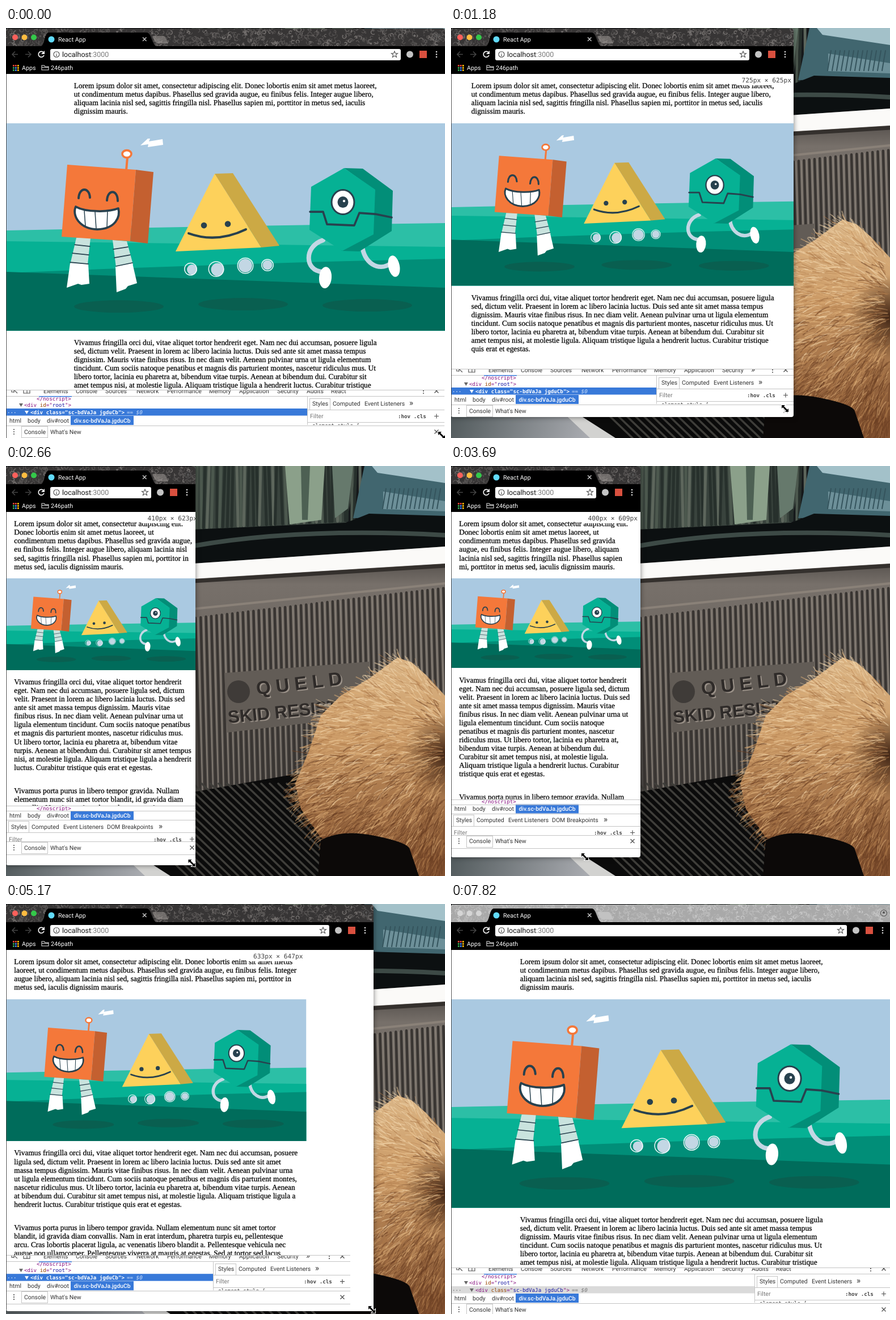
Animation, 774 px wide and 723 px high, one loop 7920 ms. Source, as an HTML page with a canvas:

```html
<!DOCTYPE html>
<html lang="en">
<head>
<meta charset="utf-8">
<title>Responsive page</title>
<style>
  html, body { margin: 0; width: 774px; height: 723px; overflow: hidden; }
  canvas { display: block; }
</style>
</head>
<body>
<canvas id="stage" width="774" height="723"></canvas>
<script>
const LOOP = 7920, STEP = 147.6, ZOOM = 0.835;
const UI = '10.5px Roboto, sans-serif';
const TITLE = '10.7px Roboto, sans-serif';
const MONO = '9.2px "DejaVu Sans Mono", monospace';
const SERIF = '13.36px "Liberation Serif", serif';
const INK = '#28414e', PALE = '#c3d7e4';

// step, window width, window height, page width, devtools width, devtools top, pointer x, pointer y
const KEYS = [
  [1, 774, 726, 773, 773, 640, 768, 718],
  [8, 604, 686, 605, 604, 603, 589, 671],
  [9, 573, 677, 590, 585, 597, 566, 668],
  [14, 437, 641, 480, 480, 572, 430, 636],
  [17, 334, 690, 350, 350, 590, 355, 686],
  [19, 334, 718, 334, 334, 612, 300, 714],
  [22, 334, 674, 334, 334, 589.5, 236, 672],
  [25, 334, 690, 334, 334, 589.5, 236, 689],
  [27, 340, 700, 334, 334, 598, 337, 697],
  [31, 544, 712, 440, 500, 612, 541, 709],
  [35, 648, 718, 528.5, 607, 621.2, 645, 715],
  [39, 768, 725, 660, 745, 636, 764, 719],
  [43, 772, 727, 773, 771, 643, 763, 717],
  [46, 776, 727, 777, 777, 643, 766, 721],
  [50, 776, 727, 777, 777, 643, 785, 740]
];

const INTRO = 'Lorem ipsum dolor sit amet, consectetur adipiscing elit. Donec lobortis enim sit amet metus laoreet, ut condimentum metus dapibus. Phasellus sed gravida augue, eu finibus felis. Integer augue libero, aliquam lacinia nisl sed, sagittis fringilla nisl. Phasellus sapien mi, porttitor in metus sed, iaculis dignissim mauris.';
const BODY = 'Vivamus fringilla orci dui, vitae aliquet tortor hendrerit eget. Nam nec dui accumsan, posuere ligula sed, dictum velit. Praesent in lorem ac libero lacinia luctus. Duis sed ante sit amet massa tempus dignissim. Mauris vitae finibus risus. In nec diam velit. Aenean pulvinar urna ut ligula elementum tincidunt. Cum sociis natoque penatibus et magnis dis parturient montes, nascetur ridiculus mus. Ut libero tortor, lacinia eu pharetra at, bibendum vitae turpis. Aenean at bibendum dui. Curabitur sit amet tempus nisi, at molestie ligula. Aliquam tristique ligula a hendrerit luctus. Curabitur tristique quis erat et egestas.';
const MORE = 'Vivamus porta purus in libero tempor gravida. Nullam elementum nunc sit amet tortor blandit, id gravida diam convallis. Nam in erat interdum, pharetra turpis eu, pellentesque arcu. Cras lobortis placerat ligula, ac venenatis libero blandit a. Pellentesque vehicula nec augue non ullamcorper. Pellentesque viverra at mauris at egestas. Sed at tortor sed lacus';

let g = document.getElementById('stage').getContext('2d');
let seed = 7;
const random = () => (seed = seed * 16807 % 2147483647) / 2147483647;

function path(d, fill, stroke, width = 1) {
  const shape = new Path2D(d);
  if (fill) { g.fillStyle = fill; g.fill(shape); }
  if (stroke) { g.strokeStyle = stroke; g.lineWidth = width; g.stroke(shape); }
}
function rect(x, y, w, h, color) { g.fillStyle = color; g.fillRect(x, y, w, h); }
function oval(x, y, rx, ry, fill, stroke, width = 1, turn = 0) {
  g.beginPath();
  g.ellipse(x, y, rx, ry, turn, 0, 7);
  if (fill) { g.fillStyle = fill; g.fill(); }
  if (stroke) { g.strokeStyle = stroke; g.lineWidth = width; g.stroke(); }
}
// y is the middle of the lower-case letters' line
function text(s, x, y, font = UI, color = '#333', align = 'left') {
  g.font = font;
  g.fillStyle = color;
  g.textAlign = align;
  g.fillText(s, x, y + (font === SERIF ? 4.4 : 3.6));
  return x + g.measureText(s).width;
}
function clipped(x, y, w, h, draw) {
  g.save();
  g.beginPath();
  g.rect(x, y, w, h);
  g.clip();
  draw();
  g.restore();
}
function layer(w, h, draw) {
  const canvas = Object.assign(document.createElement('canvas'), { width: w, height: h });
  const previous = g;
  g = canvas.getContext('2d');
  g.lineCap = g.lineJoin = 'round';
  draw();
  g = previous;
  return canvas;
}

const lace = (base, thread, glow) => layer(790, 32, () => {
  seed = 11;
  rect(0, 0, 790, 32, base);
  for (let i = 0; i < 800; i++) {
    const x = random() * 790, y = random() * 32, r = 1 + random() * 3, a = random() * 6;
    g.beginPath();
    g.arc(x, y, r, a, a + 2 + random() * 3);
    g.strokeStyle = i % 5 ? thread : glow;
    g.lineWidth = 0.7 + random();
    g.stroke();
  }
});
const activeBar = lace('#373535', '#585554', '#787472');
const idleBar = lace('#a9a9a9', '#b9b9b9', '#cacaca');

function windows() {
  path('M330 0H620L600 100L330 125Z', '#39433d');
  seed = 3;
  for (let x = 330; x < 625; x += 7) {
    path(`M${x} 0l${random() * 8 - 4} ${110 - (x - 330) * 0.05}`, null, ['#27302c', '#4c584e', '#5d665c'][Math.floor(random() * 3)], 5);
  }
  path('M492 0H562L556 95L500 103Z', '#8ba08a');
  path('M520 0H536L532 95H522Z', '#4d6053');
  path('M575 0H612L603 75L580 92Z', '#66796c');
  path('M632 0H774V88L612 92Z', '#41666f');
  path('M645 0H774V30L655 12Z', '#a3c1c9');
  path('M665 45L774 62V80L665 76Z', '#6d9099');
  for (let x = 670; x < 774; x += 8) path(`M${x} 40l-6 35`, null, '#35545d', 2);
  path('M330 112L600 100L640 84L774 88V142L330 172Z', '#0c1011');
  path('M330 141Q520 108 774 122', null, '#3d4a46', 8);
}

function tailgate() {
  const metal = g.createLinearGradient(0, 170, 0, 560);
  metal.addColorStop(0, '#56514d');
  metal.addColorStop(0.1, '#77706a');
  metal.addColorStop(0.6, '#66605a');
  metal.addColorStop(1, '#4b4744');
  path('M330 172L774 142V723H330Z', metal);
  path('M330 172L774 142V172L330 199Z', '#fbfaf8');
  path('M330 203L774 176', null, '#34302d', 7);
  path('M330 252L774 207', null, '#8a8178', 4);
  for (let x = 334; x < 774; x += 9.3) {
    const top = 268 - (x - 334) * 0.12, low = 572 - (x - 334) * 0.15;
    path(`M${x} ${top}L${x + 8} ${low}`, null, '#393532', 4.5);
    path(`M${x + 4.5} ${top}L${x + 12.5} ${low}`, null, '#867e75', 1.8);
  }
  path('M385 365L640 345V430L560 450L390 470Z', '#625c56');
  oval(410, 398, 20, 20, '#3f3b38');
  const emboss = (s, x, y, size, turn) => {
    g.save();
    g.translate(x, y);
    g.rotate(turn);
    const font = `bold ${size}px "Liberation Sans", sans-serif`;
    text(s, 2, 2, font, '#9a9188');
    text(s, 0, 0, font, '#2f2b29');
    g.restore();
  };
  emboss('Q U E L D', 442, 400, 33, -0.12);
  emboss('SKID RESIST', 392, 450, 31, -0.1);
}

function truckBed() {
  path('M0 560L330 575L500 545L774 500V723H0Z', '#0b0b0b');
  for (let x = 150; x < 700; x += 15) path(`M${x} 560L${x + 170} 723`, null, '#3f3e3a', 3.5);
  const silver = g.createLinearGradient(0, 640, 240, 723);
  silver.addColorStop(0, '#4c5557');
  silver.addColorStop(1, '#a9abb0');
  path('M0 600H120L255 723H0Z', silver);
  path('M120 605L160 640L290 723H245Z', '#d2d2d0');
}

function fur() {
  const outline = 'M774 405L740 368L715 346L690 338L640 375L590 405L555 440L535 500L510 560L520 605L555 655L640 680L720 723H774Z';
  const body = new Path2D(outline);
  const coat = g.createLinearGradient(650, 340, 640, 690);
  coat.addColorStop(0, '#d9b485');
  coat.addColorStop(0.4, '#cb9a66');
  coat.addColorStop(1, '#80502f');
  path(outline, coat);
  const dark = g.createRadialGradient(774, 510, 5, 774, 510, 75);
  dark.addColorStop(0, 'rgba(50,25,12,.85)');
  dark.addColorStop(1, 'rgba(50,25,12,0)');
  rect(690, 430, 84, 160, dark);
  seed = 5;
  g.globalAlpha = 0.5;
  for (let i = 0; i < 3600; i++) {
    const x = 505 + random() * 269, y = 338 + random() * 385;
    if (!g.isPointInPath(body, x, y)) continue;
    // hair fans out from the right edge and hangs lower down
    const a = Math.atan2(y - 500, x - 830) + (random() - 0.5) * 0.8, n = 10 + random() * 20;
    const light = random() * 1.1 - (y - 340) / 420 - (x > 735 ? 0.2 : 0);
    const tone = light > 0.45 ? '#f3d8ae' : light > 0.1 ? '#dcae78' : light > -0.25 ? '#b07b4b' : '#6b4023';
    path(`M${x} ${y}q${Math.cos(a) * n * 0.5} ${Math.sin(a) * n * 0.3} ${Math.cos(a) * n} ${Math.sin(a) * n + 4}`, null, tone, 0.8 + random() * 1.4);
  }
  g.globalAlpha = 1;
  path('M555 660Q590 640 650 652T712 676L728 723H550Z', '#0c0908');
}

const photo = layer(774, 723, () => {
  rect(0, 0, 774, 723, '#15181a');
  windows();
  tailgate();
  truckBed();
  fur();
});

function scene(x, y, scale) {
  g.save();
  g.translate(x, y);
  g.scale(scale, scale);
  g.lineCap = g.lineJoin = 'round';
  rect(0, 0, 773, 365.6, '#aac9e1');
  path('M0 189Q380 181 773 176V365.6H0Z', '#2cbfa6');
  path('M0 208L773 218V365.6H0Z', '#06b194');
  path('M0 264Q390 247 773 239V365.6H0Z', '#018e78');
  path('M0 262L773 290V365.6H0Z', '#006c5b');
  oval(198, 323, 79, 11, '#095f50');
  oval(417, 319, 79, 11, '#095f50');
  oval(636, 321, 79, 11, '#095f50');
  path('M236 39L249 27L253 27L251 32L275 28L276 38L249 42L250 37Z', '#fff');

  // cube
  path('M123 202H148L143 249H112Z M187 206L212 208L223 249L193 254Z', '#c9e3de');
  path('M112 247L144 248L146 283L132 285L126 283L106 290Z M192 253L222 247L230 282L214 287L210 292L194 298Z', '#fff');
  path('M120 214L147 217M116 229L145 232M112 245L144 248M188 222L214 218M190 237L218 232M193 252L222 246', null, INK, 1.6);
  path('M211 83L213 60', null, '#f4783a', 4);
  oval(212, 54, 8, 6.5, '#fff', '#f4783a', 3.6);
  path('M107 73L228 82L218 208L97 200Z', '#f4783a');
  path('M228 82L259 86L249 212L218 208Z', '#c46030');
  path('M127 132C128 112 146 112 147 131M177 136C178 116 196 116 196 137', null, INK, 4);
  path('M122 147C115 162 128 186 160 187C192 186 201 165 197 150C180 157 140 157 122 147Z', '#fff', INK, 3.8);
  path('M137 154L139 181M156 156L158 186M178 155L177 183', null, INK, 1.5);

  // pyramid
  path('M367 89L449 219L298 226Z', '#fdd15b');
  path('M367 89L399 88L481 216L449 219Z', '#cca945');
  oval(348, 180, 5.3, 5.3, INK);
  oval(390, 177.5, 5.3, 5.3, INK);
  path('M321 194Q370 212 422 187', null, INK, 4);
  [[326, 257, 9], [371, 257, 11.5], [421, 251, 12], [460, 250, 8.5]].forEach(([bx, by, r], i) => {
    oval(bx + (i < 2 ? 1 : 0), by + (i < 2 ? 1 : 0), r, r, PALE);
    oval(bx - (i < 2 ? 1.5 : 0), by, r + 1.7, r + 1.7, null, '#eff8fa', 1.5);
  });

  // hexagon
  path('M558 206C524 217 525 260 557 262M627 215C629 245 655 263 678 247', null, PALE, 8);
  oval(562, 272, 11, 19, '#fff', null, 1, 0.08);
  oval(683, 252, 10, 19, '#fff', null, 1, -0.2);
  path('M595 79L628 80L681 119L679 190L622 226L590 225L640 190L645 115Z', '#028e78');
  path('M595 79L650 117L647 196L592 225L534 188L537 112Z', '#06b194');
  oval(593, 139, 20, 21.5, '#fff', INK, 3);
  oval(593, 139, 9.5, 10, INK);
  oval(595, 137, 2.2, 2.2, '#fff');
  path('M535 156L558 156L565 178L613 180L622 158L650 160L679 166', null, INK, 3.6);
  g.restore();
}

// Returns the middle of the last line
function paragraph(words, x, y, width) {
  const print = line => {
    text(line, x, y, SERIF, '#000');
    g.strokeStyle = '#000';
    g.lineWidth = 0.25;
    g.strokeText(line, x, y + 4.4);
  };
  let line = '';
  g.font = SERIF;
  for (const word of words.split(' ')) {
    const longer = line ? line + ' ' + word : word;
    if (g.measureText(longer).width > width) {
      print(line);
      y += 15.03;
      line = word;
    } else line = longer;
  }
  print(line);
  return y;
}

function page(width, bottom, labelled) {
  clipped(1, 81, width, bottom - 83, () => {
    const column = Math.min(534.4, width - 27.5), x = (width - column) / 2 + 0.5;
    const top = paragraph(INTRO, x, 102, column) + 21;
    scene(1, top, width / 773);
    const end = paragraph(BODY, x, top + width * 0.473 + 21, column);
    paragraph(MORE, x, end + 41, column);
    if (labelled) {
      rect(width - 102, 81, 104, 20, '#fff');
      text(`${Math.round(width / ZOOM)}px × ${Math.round((bottom - 81) / ZOOM)}px`, width - 5, 92.5,
        '11.2px "DejaVu Sans Mono", monospace', '#444', 'right');
    }
  });
}

function chrome(width, focused) {
  g.drawImage(focused ? activeBar : idleBar, 0, 1);
  rect(0, 32, width, 49, '#000');
  ['#fc605b', '#fdbc40', '#34c84a'].forEach((c, i) => oval(16 + i * 16.5, 16.5, 5, 5, focused ? c : '#d5d5d5'));
  path('M62 32C68 30 68 9 75 8H249C256 9 258 30 265 32Z', '#000');
  path('M258 14H278Q281 14 286 27H268Q263 27 258 14Z', focused ? 'rgba(150,145,142,.6)' : '#c2c2c2');
  oval(width - 13, 16, 5.5, 5.5, null, '#555', 1.2);
  oval(width - 13, 15, 2, 2, '#555');
  oval(80, 20, 5.5, 5.5, '#61dafb');
  text('React App', 92, 20, TITLE, '#fff');
  path('M241 16.500L247.500 23M247.500 16.500L241 23', null, '#ccc', 1.4);
  path('M21 46.500H11M16 41.500L11 46.500L16 51.500M34 46.500H44M39 41.500L44 46.500L39 51.500', null, '#444', 1.6);
  path('M66 43A5 5 0 1 0 67 48', null, '#fff', 1.7);
  path('M68 40V46H62Z', '#fff');
  g.beginPath();
  g.roundRect(78, 37, width - 156, 20, 3);
  g.fillStyle = '#fff';
  g.fill();
  oval(89, 46.5, 5, 5, null, '#555', 1.2);
  path('M89 43.500V44.500M89 46V50', null, '#555', 1.2);
  const url = '12.5px Roboto, sans-serif';
  text(':3000', text('localhost', 99, 47, url, '#111'), 47, url, '#777');

  g.save();
  g.translate(width - 89, 46.5);
  path('M0 -5.500L1.500 -1.800H5.500L2.400 .8L3.500 5L0 2.600L-3.500 5L-2.400 .8L-5.500 -1.800H-1.500Z', null, '#555', 1.1);
  oval(27, 0, 6, 6, '#c4c4c4');
  rect(44, -6.5, 13, 13, '#d9503f');
  for (const y of [-4.5, 0, 4.5]) oval(74, y, 1.3, 1.3, '#ddd');
  g.restore();

  const dots = ['#ea4335', '#ea4335', '#fbbc05', '#34a853', '#4285f4', '#fbbc05', '#34a853', '#4285f4', '#fbbc05'];
  dots.forEach((c, i) => rect(12 + i % 3 * 4, 65 + Math.floor(i / 3) * 4, 2.8, 2.8, c));
  text('Apps', 28, 70, TITLE, '#fff');
  path('M63 74V66H67L69 68H75V74ZM63 69.500H75', null, '#ddd', 1.1);
  text('246path', 79, 70, TITLE, '#fff');
}

function code(parts, x, y, font = MONO) {
  for (const [s, color] of parts) x = text(s, x, y, font, color);
}
const rule = (x, y, w) => rect(x, Math.round(y), w, 1, '#c4c4c4');
const cross = (x, y, r = 3.5) => path(`M${x - r} ${y - r}l${2 * r} ${2 * r}M${x + r} ${y - r}l${-2 * r} ${2 * r}`, null, '#555', 1.4);
const kebab = (x, y) => [-4, 0, 4].forEach(d => oval(x, y + d, 1.1, 1.1, '#555'));

function styleTabs(names, x, y) {
  g.strokeStyle = '#c4c4c4';
  g.lineWidth = 1;
  g.strokeRect(Math.round(x) + 4.5, Math.round(y) - 9.5, 36, 20);
  names.forEach(([name, dx]) => text(name, x + dx, y, name === '»' ? '15px Roboto, sans-serif' : UI));
}
function filterRow(x, right, y) {
  text('Filter', x + 5, y, UI, '#777');
  text(':hov .cls', right - 82, y, 'bold ' + MONO, '#444');
  path(`M${right - 18} ${y}h8m-4 -4v8`, null, '#555', 1.2);
}
function breadcrumb(y) {
  rect(114, y - 8, 111, 16, '#3879d9');
  text('html', 6, y);
  text('body', 38, y);
  text('div#root', 72, y);
  text('div.sc-bdVaJa.jgduCb', 169.5, y, '500 10.3px Roboto, sans-serif', '#fff', 'center');
}

function elementsPanel(width, top, focused) {
  const split = width - 242;
  const tag = '#881280', name = '#994500', value = '#1a1aa6';
  clipped(0, top - 1, width, 12, () => {
    path(`M10 ${top - 4}v6h4m0 -4l6 6m-6 -6v5M31 ${top - 6}h11v10h-11zM37 ${top - 6}v10`, null, '#555', 1.2);
    const tabs = { Elements: 66, Console: 123, Sources: 175, Network: 230, Performance: 284, Memory: 358, Application: 411, Security: 478, Audits: 530, React: 573 };
    for (const tab in tabs) if (tabs[tab] + 60 < width - 55) text(tab, tabs[tab], top);
    if (width < 650) text('»', 529, top, '15px Roboto, sans-serif');
    kebab(width - 37, top);
    cross(width - 14, top);
  });
  rule(0, top + 9, width);
  rect(58, top + 9, 58, 1.5, '#3879d9');
  clipped(0, top + 10, split, 34, () => {
    text('</noscript>', 54, top + 13, MONO, tag);
    path(`M23 ${top + 22}h7l-3.500 6z`, '#666');
    code([['<div ', tag], ['id', name], ['="', tag], ['root', value], ['">', tag]], 32, top + 24.5);
    rect(0, top + 31, split, 12.5, focused ? '#3879d9' : '#dadada');
    const pick = c => focused ? '#fff' : c;
    text('...', 2, top + 35, MONO, pick('#666'));
    path(`M33 ${top + 35}h7l-3.500 6z`, pick('#666'));
    code([['<div ', pick(tag)], ['class', pick(name)], ['="', pick(tag)], ['sc-bdVaJa jgduCb', pick(value)], ['">', pick(tag)]],
      43, top + 37, focused ? 'bold ' + MONO : MONO);
    text('== $0', 213, top + 37, 'italic ' + MONO, focused ? '#cfe0fa' : '#777');
  });
  breadcrumb(top + 52);
  rect(split, top + 10, 1, 50, '#c4c4c4');
  styleTabs([['Styles', 9], ['Computed', 45], ['Event Listeners', 101], ['»', 180]], split, top + 22.5);
  rule(split, top + 33, 242);
  filterRow(split, width, top + 44.5);
  rule(split, top + 55, 242);
  clipped(split, top + 56, 242, 4, () => text('element.style {', split + 9, top + 60, MONO));
}

function compactPanel(width, top) {
  const wide = width > 400, right = wide ? 302 : width;
  clipped(0, top - 1, width, 8, () => text('</noscript>', 54, top + 2, MONO, '#881280'));
  breadcrumb(top + 15);
  rule(0, top + 7, width);
  rule(0, top + 23, width);
  styleTabs(wide
    ? [['Styles', 9], ['Event Listeners', 45], ['DOM Breakpoints', 122], ['Properties', 210], ['Accessibility', 264]]
    : [['Styles', 9], ['Computed', 45], ['Event Listeners', 101], ['DOM Breakpoints', 178], ['»', 269]], 0, top + 35);
  rule(0, top + 45, width);
  clipped(0, top + 46, width, 15, () => {
    filterRow(0, right, top + 57);
    if (wide) rect(302, top + 46, 1, 15, '#c4c4c4');
  });
}

function devtools(width, top, focused) {
  rule(0, top - 2, width);
  if (width > 530) elementsPanel(width, top, focused);
  else compactPanel(width, top);
  rule(0, top + 61, width);
  kebab(14, top + 72);
  g.strokeStyle = '#c4c4c4';
  g.lineWidth = 1;
  g.strokeRect(27.5, Math.round(top) + 62.5, 46, 20);
  text('Console', 32, top + 72);
  text("What's New", 78, top + 72);
  cross(width - 14, top + 72);
  rule(0, top + 84, width);
}

function pointer(x, y) {
  g.save();
  g.translate(x, y);
  const arrow = 'M-6 -6H0L-2 -4L4 2L6 0V6H0L2 4L-4 -2L-6 0Z';
  path(arrow, '#000', '#fff', 2);
  path(arrow, '#000');
  g.restore();
}

function pose(step) {
  const next = KEYS.findIndex(key => key[0] > step);
  if (next === 0) return KEYS[0].slice(1);
  if (next < 0) return KEYS[KEYS.length - 1].slice(1);
  const a = KEYS[next - 1], b = KEYS[next], p = (step - a[0]) / (b[0] - a[0]);
  return a.slice(1).map((v, i) => v + (b[i + 1] - v) * p);
}

function draw(time) {
  const step = Math.floor(time / STEP + 0.05), focused = step < 52;
  const [width, height, pageWidth, toolsWidth, toolsTop, x, y] = pose(step);
  g.drawImage(photo, 0, 0);
  g.save();
  g.beginPath();
  g.roundRect(0, 1, width, height - 1, 4);
  g.shadowColor = 'rgba(0,0,0,.5)';
  g.shadowBlur = 10;
  g.fillStyle = '#fff';
  g.fill();
  g.shadowColor = 'transparent';
  g.clip();
  page(pageWidth, toolsTop, step > 1 && step < 46);
  devtools(toolsWidth, toolsTop, focused);
  chrome(width, focused);
  rect(0, 81, 1, height, '#555');
  g.restore();
  pointer(x, y);
}

g.textRendering = 'geometricPrecision';
function tick() {
  draw(performance.now() % LOOP);
  requestAnimationFrame(tick);
}
tick();
</script>
</body>
</html>
```
